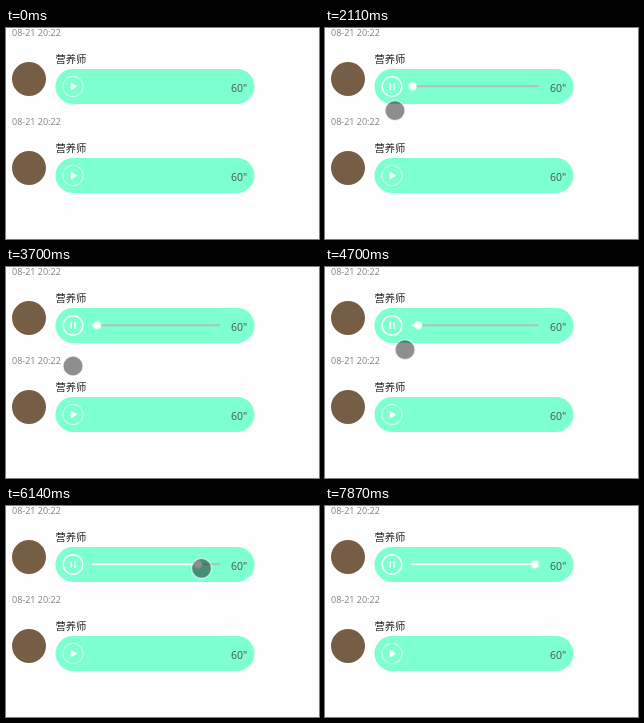
These frames come from a looping animation (313 by 211 pixels, 8 s). An HTML page:

```html
<!DOCTYPE html>
<html lang="zh">
<meta charset="utf-8">
<title>Voice messages</title>
<style>
html, body { margin: 0; height: 100%; overflow: hidden; background: #fefefe; }
svg { display: block; width: 313px; height: 211px; }
text { font-family: "Open Sans", "Noto Sans CJK SC", sans-serif; }
.date { font-size: 9px; fill: #808080; }
.name { font-size: 10.3px; fill: #222; font-family: "Noto Sans CJK SC", "Noto Sans CJK", sans-serif; }
.length { font-size: 10.5px; fill: #4a5551; }
.line { stroke: #fff; stroke-width: 2; stroke-linecap: round; }
</style>
<svg viewBox="0 0 313 211">
  <defs>
    <g id="message">
      <text class="date" x="6" y="8">08-21 20:22</text>
      <circle cx="23" cy="51" r="17" fill="#765d45"/>
      <text class="name" x="49.5" y="34.5">营养师</text>
      <rect x="49.5" y="41" width="199" height="35" rx="17.5" fill="#7dffd0"/>
      <text class="length" x="225" y="64">60"</text>
    </g>
    <g id="playIcon" stroke="#fff">
      <circle cx="67" cy="58.5" r="10.2" fill="none" stroke-opacity=".75"/>
      <path d="M65.2 55.2v6.6l5.3-3.3z" fill="#fff" stroke-linejoin="round"/>
    </g>
  </defs>
  <use href="#message"/>
  <use href="#message" y="89"/>
  <use href="#playIcon" y="89"/>
  <use href="#playIcon" id="play"/>
  <g id="player">
    <circle cx="67" cy="58.5" r="9.8" fill="none" stroke="#fff" stroke-width="1.5"/>
    <path d="M65.2 55v7M69 55v7" stroke="#fff" stroke-width="1.5"/>
    <path class="line" d="M87 58.3H213" style="stroke:#a9c4b9"/>
    <path class="line" id="done"/>
    <circle id="glow" cy="58.3" r="4.6" fill="#fff" opacity=".4"/>
    <circle id="knob" cy="58.3" r="3.5" fill="#fff"/>
  </g>
  <circle id="pointer" r="10" fill="#000" fill-opacity=".44" stroke="#fff" stroke-opacity=".65" stroke-width="1.3"/>
</svg>
<script>
const $ = id => document.getElementById(id);
const LOOP = 8000, ENTER = 500, START = 1810, GRAB = 5660, DROP = 6380, LEAVE = 7350;
const LEFT = 87.4, SPEED = .0021; // knob start and px per ms

const linear = u => u;
const smooth = u => u * u * (3 - 2 * u);
const out = power => u => 1 - (1 - u) ** power;

// Each move starts where the one before it ended; via bends it
const moves = [
  { at: ENTER, end: 1040, to: [78, 61], ease: out(4) },
  { at: 1320, end: 1380, to: [71, 58] },
  { at: START, end: 2770, to: [46, 167], via: [72, 110], ease: smooth },
  { at: 2950, end: 3250, to: [67, 99], ease: smooth },
  { at: 4400, end: 5140, to: [103, 54], ease: smooth },
  { at: 5260, end: 5380, to: [98.5, 58] },
  { at: GRAB, end: DROP, to: [211, 63], ease: out(1.8) },
  { at: 6630, end: LEAVE, to: [260, 215], via: [170, 150], ease: smooth }
];

function pointerAt(t) {
  let pos = [0, 67];
  for (const { at, end, to, via, ease = linear } of moves) {
    if (t < at) break;
    const s = ease(Math.min(1, (t - at) / (end - at)));
    pos = pos.map((a, i) => {
      const mid = via ? via[i] : (a + to[i]) / 2;
      return a * (1 - s) ** 2 + 2 * mid * s * (1 - s) + to[i] * s * s;
    });
  }
  return pos;
}

function knobAt(t, x) {
  if (t >= GRAB && t < DROP) return x - 3.5;
  const tick = 10 + Math.floor((t - 10) / 240) * 240;
  return t < GRAB ? Math.max(LEFT, LEFT + (tick - START) * SPEED) : 207.2 + (tick - DROP) * SPEED;
}

function show(id, visible) {
  $(id).style.display = visible ? "" : "none";
}

function draw(t) {
  const [x, y] = pointerAt(t), knob = knobAt(t, x);
  show("play", t < START);
  show("player", t >= START);
  show("pointer", t >= ENTER && t < LEAVE);
  $("done").setAttribute("d", `M87 58.3H${knob}`);
  for (const id of ["glow", "knob"]) $(id).setAttribute("cx", knob);
  $("pointer").setAttribute("cx", x);
  $("pointer").setAttribute("cy", y);
}

function frame() {
  draw(performance.now() % LOOP);
  requestAnimationFrame(frame);
}
frame();
</script>
</html>
```
